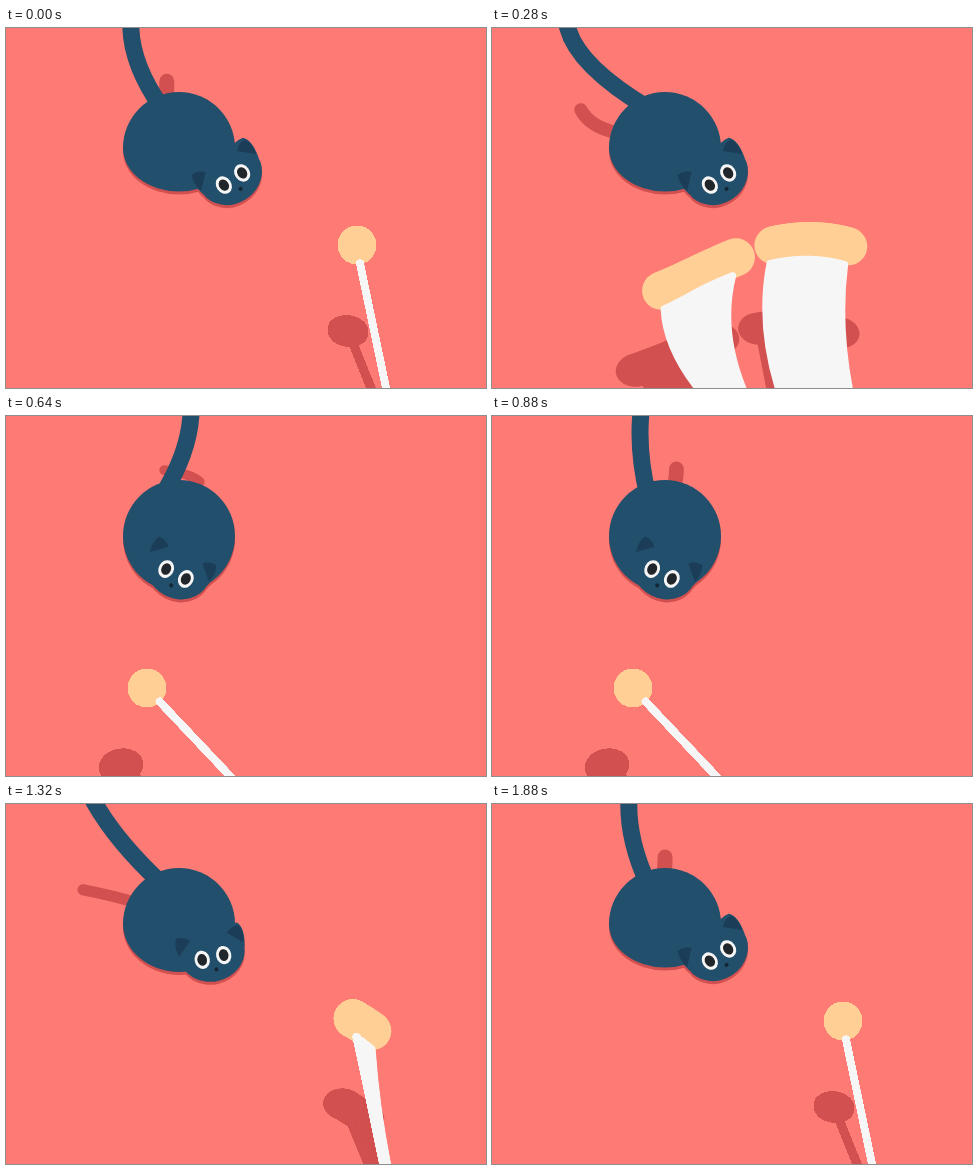
Write an HTML page with a canvas that moves like this. It is 480 by 360 pixels and loops after 1920 ms.

```html
<!DOCTYPE html>
<html lang="en">
<head>
<meta charset="utf-8">
<title>Cat and toy</title>
<style>
  html, body { margin: 0; width: 100%; height: 100%; overflow: hidden; background: #fe7b75; }
  canvas { display: block; width: 480px; height: 360px; }
</style>
</head>
<body>
<canvas id="stage" width="480" height="360"></canvas>
<script>
const ctx = document.getElementById('stage').getContext('2d');
const LOOP = 1920, SWAY = 960, STEP = 40, SAMPLES = 32, TAU = 2 * Math.PI;
const BG = '#fe7b75', SHADE = '#d2504f', FUR = '#224f6c', EAR = '#1b3d57',
      BALL = '#ffcf96', WHITE = '#f7f6f6', PUPIL = '#20262a';

const lerp = (a, b, u) => a + (b - a) * u;
const ease = u => u * u * (3 - 2 * u);
const ramp = (a, b, t) => ease(Math.min(1, Math.max(0, (t - a) / (b - a))));
const wave = (t, peak) => Math.cos(TAU * (t - peak) / SWAY);

// Runs -1..1 from its leftmost time; skew makes the way right quicker than the way back.
function swing(t, left, skew) {
  return -Math.cos(TAU * (t - left) / SWAY + skew * (1 - wave(t, left)));
}

// Wind up, dash, then settle like a spring.
function dash(d, length) {
  const windUp = -0.025;
  if (d < 0) return windUp * Math.exp(d / 30);
  if (d < length) return lerp(windUp, 1, d / length);
  const rest = d - length;
  return 1 + 0.33 * Math.exp(-rest / 30) * Math.sin(TAU * rest / 120);
}
const travel = (t, length) => dash(t - 240, length) - dash(t - 1193.5, length);

function oval(x, y, rx, ry, turn, color) {
  ctx.fillStyle = color;
  ctx.beginPath();
  ctx.ellipse(x, y, rx, ry, turn, 0, TAU);
  ctx.fill();
}

function curve(x0, y0, cx, cy, x1, y1, width, color) {
  ctx.strokeStyle = color;
  ctx.lineWidth = width;
  ctx.beginPath();
  // a short straight lead-in keeps the end outside the stage
  if (y0 === 0) ctx.moveTo(x0 - (cx - x0) / 4, -cy / 4);
  ctx.lineTo(x0, y0);
  ctx.quadraticCurveTo(cx, cy, x1, y1);
  ctx.stroke();
}

function drawTailShadow(t) {
  const lean = swing(t, 255, 0.19);
  const flat = ((1 - wave(t, 40)) / 2) ** 2;
  const tipX = 137 + 62 * swing(t, 400, 0.35);
  const tipY = 53 + 33 * ((1 + wave(t, 345)) / 2) ** 3;
  const baseX = 160 + 35 * lean, baseY = 85 - 20 * lean;
  curve(tipX, tipY, lerp(tipX, baseX, flat), lerp(baseY, tipY, flat),
    baseX, baseY, 15 - 7 * flat, SHADE);
}

function drawTail(t) {
  const top = 131 + 56 * swing(t, 255, 0.19);
  const bend = -4 + 12 * wave(t, 623) + 4 * Math.cos(2 * TAU * t / SWAY);
  curve(top, 0, (top + 156) / 2 + 2 * bend, 38, 156, 80, 17, FUR);
}

function inHead(u, paint) {
  ctx.save();
  ctx.translate(lerp(227, 170, u), lerp(151, 158, u));
  ctx.rotate(lerp(-0.588, 0.464, u));
  paint();
  ctx.restore();
}

function bothEars(color, path) {
  ctx.fillStyle = color;
  for (const side of [-1, 1]) {
    ctx.save();
    ctx.scale(side, 1);
    ctx.beginPath();
    path();
    ctx.fill();
    ctx.restore();
  }
}

function drawShape(u, color) {
  ctx.fillStyle = color;
  ctx.beginPath();
  ctx.arc(173, 120, 56, Math.PI, TAU);
  ctx.ellipse(173, 120, 56, lerp(43.5, 56, u), 0, 0, Math.PI);
  ctx.fill();
  inHead(u, () => {
    oval(0, -5, 33, 29, 0, color);
    bothEars(color, () => {
      ctx.moveTo(8, -25);
      ctx.quadraticCurveTo(22, -31, 31, -29);
      ctx.quadraticCurveTo(38, -22, 33, -3);
    });
  });
}

function drawCat(t) {
  const u = ramp(300, 400, t) - ramp(1260, 1360, t);
  drawTailShadow(t);
  ctx.save();
  ctx.translate(0, 3);
  drawShape(u, SHADE);
  ctx.restore();
  drawTail(t);
  drawShape(u, FUR);

  const glance = -1.5 * (ramp(1140, 1200, t) - ramp(1240, 1300, t));
  inHead(u, () => {
    bothEars(EAR, () => {
      ctx.moveTo(19, -21);
      ctx.quadraticCurveTo(24, -27, 32, -26);
      ctx.quadraticCurveTo(36, -18, 33, -8);
    });
    for (const x of [-11, 11]) {
      oval(x, 0, 7.6, 9.2, 0, WHITE);
      oval(x + glance, 0, 4.8, 6, 0, PUPIL);
    }
    oval(0.8, 12.4, 2, 2, 0, '#142636');
  });
}

function toyPose(t) {
  const p = travel(t, 46), footP = travel(t + 6, 36);
  const lift = t > LOOP * 3 / 8 ? 40 : 16;
  const x = 351 - 210 * p;
  const y = 217 + 55 * ease(p) - lift * Math.sin(Math.PI * p);
  return { p, x, y, foot: 380 - 156 * footP, lead: footP - p };
}

function drawToyShadow({ p, x, y, foot }) {
  const sx = x - 9 - 17 * p, sy = y + 86 - 8 * p;
  const ex = sx + (375 - sy) * (0.15 + 1.25 * (foot - x) / (360 - y));
  curve(sx, sy, (sx + ex) / 2, (sy + 375) / 2, ex, 375, 8, SHADE);
  oval(sx, sy, 20 + 2 * p, 15.5 + 1.5 * p, 0.15 - 0.35 * p, SHADE);
}

function drawStick({ p, x, y, foot, lead }) {
  const angle = lerp(0.16, 0.75, p) - 2 * lead;
  const tx = x + 18.5 * Math.sin(angle), ty = y + 18.5 * Math.cos(angle);
  const cx = (tx + foot) / 2 - 60 * lead, cy = (ty + 360) / 2;
  curve(tx, ty, cx, cy, foot + (foot - cx) * 0.1, 360 + (360 - cy) * 0.1, 7, WHITE);
}

// Two open-shutter spans per step give the fast swing its split smear.
function drawToy(t) {
  const poses = [[-40, -24], [-16, 0]].flatMap(([from, to]) =>
    Array.from({ length: SAMPLES }, (_, i) => toyPose(t + lerp(from, to, i / (SAMPLES - 1)))));
  poses.forEach(drawToyShadow);
  poses.forEach(({ x, y }) => oval(x, y, 19, 19, 0, BALL));
  poses.forEach(drawStick);
}

function draw(now) {
  const t = Math.floor((now % LOOP) / STEP) * STEP;
  ctx.lineCap = 'round';
  ctx.fillStyle = BG;
  ctx.fillRect(0, 0, 480, 360);
  drawCat(t);
  drawToy(t);
}

const start = performance.now();
function tick() {
  draw(performance.now() - start);
  requestAnimationFrame(tick);
}
tick();
</script>
</body>
</html>
```
